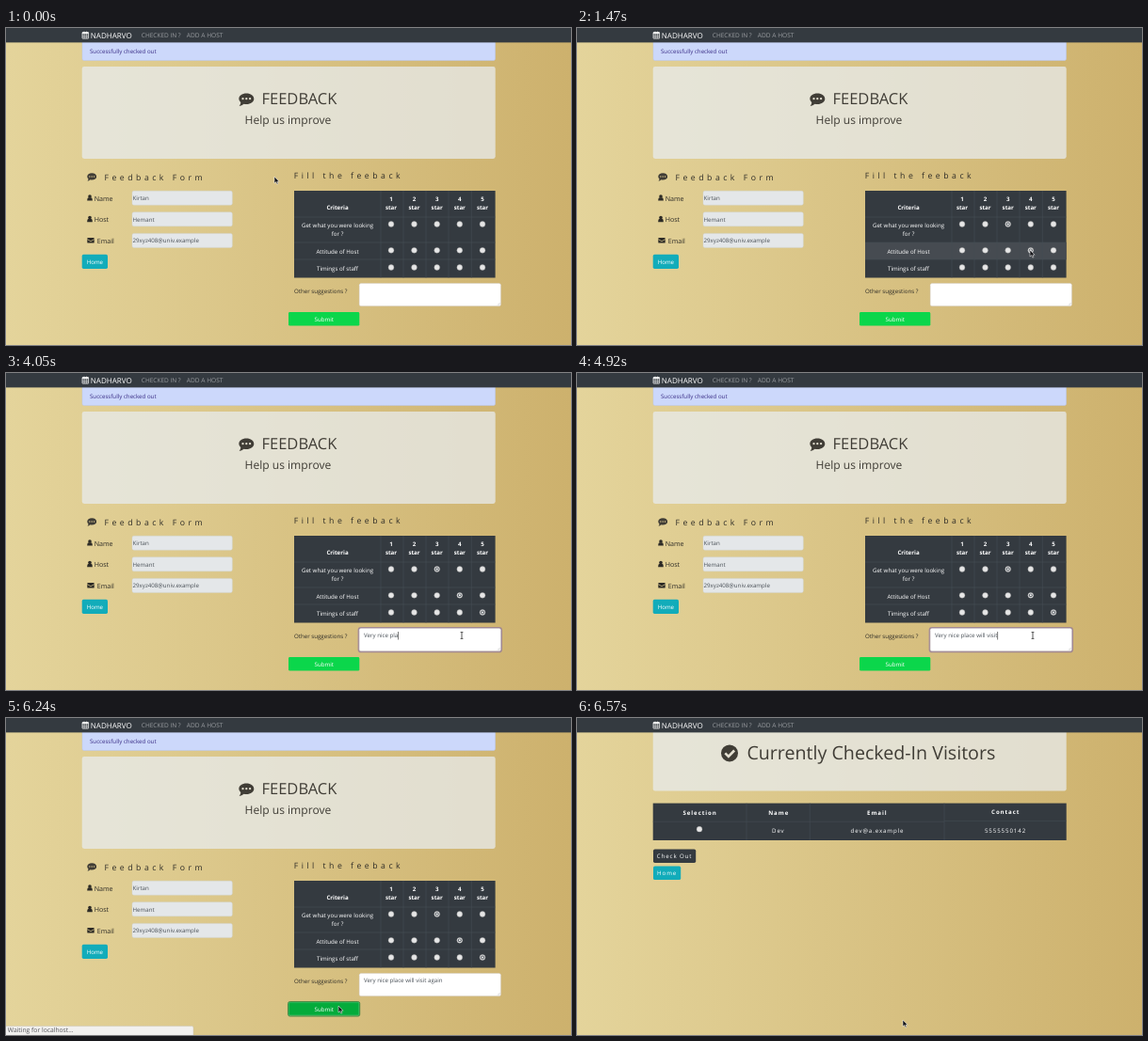
An HTML page for the animation above (6720 ms loop, 600 px wide and 337 px high).

```html
<!DOCTYPE html>
<html lang="en">
<head>
<meta charset="utf-8">
<title>Visitor feedback form</title>
<style>
  html, body { margin: 0; width: 100%; height: 100%; overflow: hidden; background: #d9c283; }
  svg { display: block; width: 100vw; height: 100vh; }
  text { font-family: "Open Sans", "Noto Sans", sans-serif; white-space: pre; text-rendering: geometricPrecision; }
</style>
</head>
<body>
<svg id="stage" viewBox="0 0 600 337" preserveAspectRatio="none"></svg>
<script>
const LOOP = 6720;
const BODY = 6.15;
const DARK = '#343a40', INK = '#2d2b26', LINE = '#454d55', FIELD = '#495057', TITLE = '#403d36';

const attrs = o => Object.entries(o).map(([k, v]) => ` ${k}="${v}"`).join('');
const rect = (x, y, w, h, fill, o = {}) => `<rect${attrs({ x, y, width: w, height: h, fill, ...o })}/>`;
const text = (x, y, s, size, fill, o = {}) => `<text${attrs({ x, y, 'font-size': size, fill, ...o })}>${s}</text>`;
const centred = (x, y, s, o = {}) => text(x, y, s, BODY, '#fff', { 'text-anchor': 'middle', ...o });
const bold = { 'font-weight': 700 };
const path = (d, fill, o = {}) => `<path${attrs({ d, fill, ...o })}/>`;
const dot = (x, y, r, fill, o = {}) => `<circle${attrs({ cx: x, cy: y, r, fill, ...o })}/>`;
const group = (id, s) => `<g id="${id}">${s}</g>`;
const lines = (d, o = {}) => path(d, 'none', { stroke: LINE, 'stroke-width': 0.6, ...o });
const radio = (x, y) => dot(x, y, 2.9, '#e6e6e6', { stroke: '#a5a5a5', 'stroke-width': 0.4 });

const bubble = (x, y, s, hole) => `<g transform="translate(${x} ${y}) scale(${s})">` +
  path('M0-6.4C4.6-6.4 8-3.8 8-.6S4.6 5.2 0 5.2Q-1.4 5.2-2.7 4.9-4.8 6.9-7.6 7.1-6.2 5.6-6 3.4-8 1.7-8-.6C-8-3.8-4.6-6.4 0-6.4Z', TITLE) +
  [-3.8, 0, 3.8].map(dx => dot(dx, -0.6, 1.15, hole)).join('') + '</g>';
const person = (x, y) => dot(x, y - 1.6, 1.8, INK) +
  path(`M${x - 2.8} ${y + 3}q0-3.4 1.6-3.4h2.4q1.6 0 1.6 3.4Z`, INK);
const envelope = (x, y) => rect(x - 3.7, y - 2.8, 7.4, 5.6, INK, { rx: 0.7 }) +
  lines(`M${x - 3.7} ${y - 1.2}L${x} ${y + 1}L${x + 3.7} ${y - 1.2}`, { stroke: '#dfcc93', 'stroke-width': 0.7 });
const calendar = rect(81, 4.6, 6.6, 6.6, 'none', { stroke: '#fff', 'stroke-width': 0.7, rx: 0.4 }) +
  rect(81, 4.6, 6.6, 1.6, '#fff') +
  lines('M83 3.4v2M85.6 3.4v2M83.2 6v5M85.4 6v5M81 7.9h6.6M81 9.6h6.6', { stroke: '#fff', 'stroke-width': 0.5 });
const button = (x, y, w, h, fill, label, o = {}) => rect(x, y, w, h, fill, { rx: 1.7 }) +
  centred(x + w / 2, y + h / 2 + 2.2, label, o);

const columns = [409, 433.5, 457.7, 481.8, 506];
const rows = [
  { top: 201, bottom: 228, radioY: 208.5, labels: [['Get what you were looking', 212], ['for ?', 220.7]] },
  { top: 228, bottom: 246, radioY: 236.3, labels: [['Attitude of Host', 239.8]] },
  { top: 246, bottom: 265.5, radioY: 254.5, labels: [['Timings of staff', 258.3]] }
];
const choices = [{ row: 0, column: 2, at: 690 }, { row: 1, column: 3, at: 1410 }, { row: 2, column: 4, at: 1830 }];

const formField = (y, icon, label, labelX, value) => icon(90, y) +
  text(labelX, y + 3, label, 7.1, INK) +
  rect(134, y - 7.4, 106.3, 15, '#e4e7e9', { rx: 1.7, stroke: '#ced4da', 'stroke-width': 0.4 }) +
  text(134.6, y + 2.4, value, BODY, FIELD);

const spaced = { 'letter-spacing': 3.5 };
const ratingTable = rect(306, 173, 213.6, 92.5, DARK) +
  rows.map((r, i) => group('row' + i, rect(306, r.top, 213.6, r.bottom - r.top, '#464b51'))).join('') +
  lines('M306 201h213.6M306 228h213.6M306 246h213.6' + [398, 422, 446, 470, 494.3].map(x => `M${x} 173v92.5`).join('')) +
  centred(352, 193.3, 'Criteria', bold) +
  columns.map((x, i) => centred(x, 184.4, i + 1, bold) + centred(x, 193.3, 'star', bold)).join('') +
  rows.map(r => r.labels.map(([s, y]) => centred(352, y, s)).join('') +
    columns.map(x => radio(x, r.radioY)).join('')).join('') +
  choices.map((c, i) => group('choice' + i, dot(columns[c.column], rows[c.row].radioY, 1.9, '#555b61') +
    dot(columns[c.column], rows[c.row].radioY, 1, '#fff'))).join('');

const feedbackPage =
  rect(81, 12, 438.5, 22.5, '#ccd8fb', { rx: 1.7, stroke: '#b9c6ee', 'stroke-width': 0.5 }) +
  text(89, 27, 'Successfully checked out', BODY, '#3a2d86') +
  rect(80.7, 41, 439, 98, '#e9ecef', { rx: 2.4, opacity: 0.74 }) +
  bubble(255.3, 75.8, 1, '#e4e0d2') +
  text(271.5, 81.3, 'FEEDBACK', 16.5, TITLE) +
  text(253.6, 101.7, 'Help us improve', 12.05, TITLE) +
  bubble(91.2, 158.3, 0.62, '#dfcc93') +
  text(104.5, 161.6, 'Feedback Form', 8.7, INK, spaced) +
  text(305.7, 159.7, 'Fill the feeback', 8.7, INK, spaced) +
  formField(180.6, (x, y) => person(x - 1, y), 'Name', 93.7, 'Kirtan') +
  formField(203.2, (x, y) => person(x - 1, y), 'Host', 93.7, 'Hemant') +
  formField(225.8, envelope, 'Email', 96.7, '29xyz408@univ.example') +
  button(80.7, 240.7, 27.3, 15.2, '#12acba', 'Home') +
  ratingTable +
  text(306, 281.5, 'Other suggestions ?', BODY, INK) +
  group('focusRing', rect(374.6, 270.9, 151.4, 25.4, 'none', { rx: 2.4, stroke: '#7a62a8', 'stroke-opacity': 0.55, 'stroke-width': 2 })) +
  rect(375.2, 271.6, 150.2, 24, '#fff', { rx: 1.7, stroke: '#d0d0d4', 'stroke-width': 0.4 }) +
  lines('M522 294.6l2.4-2.4M523.4 294.6l1-1', { stroke: '#999', 'stroke-width': 0.4 }) +
  text(380, 281.4, '', BODY, FIELD, { id: 'comment' }) +
  rect(380, 275, 0.6, 8.5, '#222', { id: 'caret' }) +
  group('submitIdle', rect(300, 302, 75.3, 14.6, '#0bd64b', { rx: 1.4 })) +
  group('submitHover', rect(300, 302, 75.3, 14.6, '#04ab3b', { rx: 1.4 })) +
  group('submitRing', rect(299.6, 301.6, 76.1, 15.4, 'none', { rx: 1.8, stroke: '#16752f', 'stroke-width': 0.8 }) +
    rect(300.6, 302.6, 74.1, 13.4, 'none', { stroke: '#d9f5df', 'stroke-width': 0.4, 'stroke-dasharray': '.5 .5' })) +
  centred(337.7, 311.5, 'Submit');

const tracked = { 'letter-spacing': 0.9 };
const heading = { ...bold, ...tracked };
const visitorsPage =
  rect(80.7, 12, 439, 65.6, '#e9ecef', { rx: 2.4, opacity: 0.74 }) +
  dot(162, 37.4, 9, TITLE) +
  lines('M157.3 37.3l3.6 3.6 6.2-6.4', { stroke: '#e4e0d2', 'stroke-width': 2.6 }) +
  text(180.4, 44.2, 'Currently Checked-In Visitors', 19.65, TITLE) +
  rect(80.7, 90.6, 439, 39.4, DARK) +
  lines('M80.7 110.2H390M390 109.4h129.7M180 90.6V130M247.3 90.6V130M390 90.6V130') +
  centred(130.6, 103.2, 'Selection', heading) + centred(214.2, 103.2, 'Name', heading) +
  centred(318.8, 103.2, 'Email', heading) + centred(455.2, 102.4, 'Contact', heading) +
  radio(130, 118.2) + centred(213.8, 122, 'Dev', tracked) +
  centred(319, 122, 'dev@a.example', tracked) + centred(455, 122.4, '5555550142', tracked) +
  button(81, 139.6, 45.2, 14.4, DARK, 'Check Out', tracked) +
  button(81, 157.5, 29.2, 14.6, '#12acba', 'Home', tracked);

const stage = document.getElementById('stage');
stage.innerHTML =
  '<defs><linearGradient id="sand"><stop stop-color="#e4d49b"/><stop offset="1" stop-color="#cdb16d"/></linearGradient></defs>' +
  rect(0, 0, 600, 337, 'url(#sand)') +
  group('feedback', feedbackPage) + group('visitors', visitorsPage) +
  rect(0, 0, 600, 15.4, DARK) + calendar +
  text(89.8, 10.8, 'NADHARVO', 8.05, '#fff') +
  text(143.8, 10.2, 'CHECKED IN ?', 6.5, '#9a9da0') + text(191.8, 10.2, 'ADD A HOST', 6.6, '#9a9da0') +
  group('status', rect(-2, 327.6, 201, 12, '#f2f1ef', { rx: 1.5, stroke: '#c9c3b2', 'stroke-width': 0.5 }) +
    text(1.8, 334.4, 'Waiting for localhost…', 6.75, '#55555a')) +
  group('arrow', path('M0 0V7.1L1.7 5.6 2.8 8.1 4 7.6 2.9 5.2H5.1Z', '#16161a', { stroke: '#fff', 'stroke-width': 0.5 })) +
  group('beam', lines('M-1.4-3.4H1.4M0-3.4V3.4M-1.4 3.4H1.4', { stroke: '#222', 'stroke-width': 0.75 }));

const el = {};
stage.querySelectorAll('[id]').forEach(node => el[node.id] = node);
const show = (id, on) => el[id].style.display = on ? '' : 'none';

// Pointer stops: time, x, y
const pointer = [
  [210, 285, 158], [600, 457, 207], [780, 457, 208], [870, 464, 230], [1230, 481, 236], [1490, 481, 236],
  [1560, 490, 247], [1770, 505, 254], [1890, 505, 254], [2160, 484, 279], [5610, 484, 279],
  [5970, 353, 306], [6255, 353, 306], [6390, 346, 321]
];
function pointerAt(t) {
  const i = pointer.findIndex(p => p[0] > t);
  if (i === 0) return pointer[0].slice(1);
  if (i < 0) return pointer.at(-1).slice(1);
  const [a, b] = [pointer[i - 1], pointer[i]];
  const u = (t - a[0]) / (b[0] - a[0]);
  const k = u * u * (3 - 2 * u);
  return [a[1] + (b[1] - a[1]) * k, a[2] + (b[2] - a[2]) * k];
}

// Bursts of typing: first key, last key, characters
const bursts = [
  [2790, 2790, 'V'], [3090, 3630, 'ery nice '], [3810, 4230, 'place '],
  [4380, 4920, 'will visit'], [5070, 5430, ' again']
];
function commentAt(t) {
  if (t >= 2430 && t < 2610) return 'v';
  return bursts.map(([start, end, s]) => {
    if (t < start) return '';
    if (t >= end) return s;
    return s.slice(0, 1 + Math.floor((t - start) / (end - start) * (s.length - 1)));
  }).join('');
}

function draw(t) {
  const onForm = t < 6270;
  const [x, y] = pointerAt(t);
  const inside = (l, top, r, bottom) => onForm && x > l && x < r && y > top && y < bottom;
  const focused = t >= 2190 && t < 6030;
  const overText = inside(375, 271, 526, 296);
  const overSubmit = inside(300, 302, 375, 317);

  show('feedback', onForm);
  show('visitors', !onForm);
  rows.forEach((r, i) => show('row' + i, inside(306, r.top, 519.6, r.bottom)));
  choices.forEach((c, i) => show('choice' + i, t >= c.at));
  show('focusRing', focused);
  show('submitIdle', !overSubmit);
  show('submitHover', overSubmit);
  show('submitRing', t >= 6030);
  show('status', t >= 6120 && t < 6300);

  el.comment.textContent = commentAt(t);
  show('caret', focused && t >= 2430);
  if (onForm) el.caret.setAttribute('x', 380 + el.comment.getComputedTextLength());

  show('arrow', !overText);
  show('beam', overText);
  const place = `translate(${x} ${y})`;
  el.arrow.setAttribute('transform', place);
  el.beam.setAttribute('transform', place);
}

const began = performance.now();
function tick() {
  draw((performance.now() - began) % LOOP);
  requestAnimationFrame(tick);
}
tick();
</script>
</body>
</html>
```
